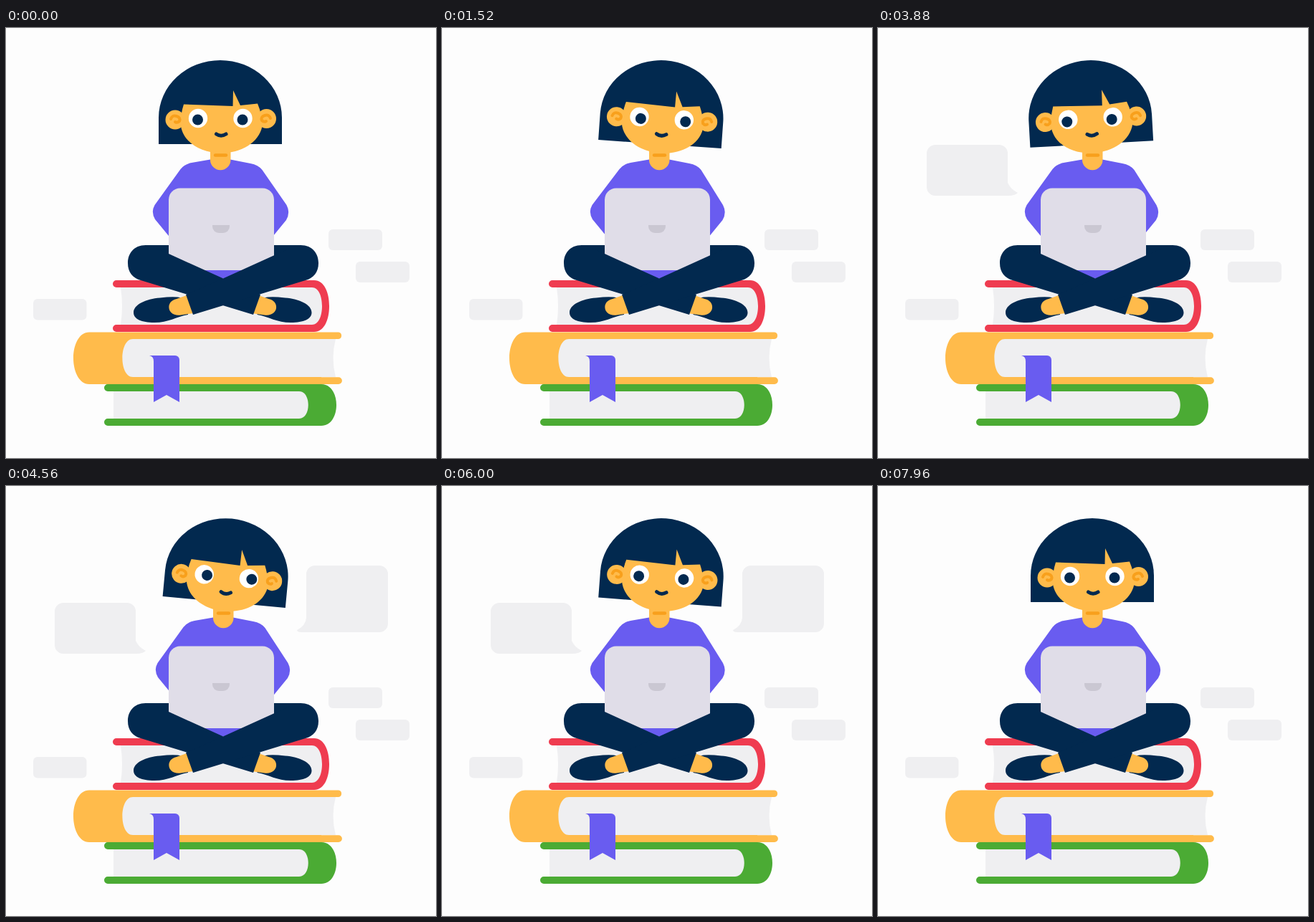
An HTML page that plays this animation: 600x600 px, repeating every 8 s.

```html
<!DOCTYPE html>
<html lang="en">
<head>
<meta charset="utf-8">
<title>Reading girl</title>
<style>
  html, body { margin: 0; width: 100%; height: 100%; overflow: hidden; background: #fdfdfd; }
  svg { display: block; width: 100vw; height: 100vh; }
  .navy { fill: #02294f; }
  .skin { fill: #ffbb4b; }
  .page { fill: #efeff1; }
  .pale { fill: #efeff1; }
  .purple { fill: #695cf0; }
  .white { fill: #fff; }
  .line { fill: none; stroke-linecap: round; }
</style>
</head>
<body>
<svg viewBox="0 0 600 600">
  <g class="pale">
    <rect x="450" y="281" width="75" height="29" rx="6"/>
    <rect x="488" y="326" width="75" height="29" rx="6"/>
    <rect x="38" y="378" width="74.500" height="29.500" rx="6"/>
    <path id="bubbleL" d="M80 163H169A12 12 0 0 1 181 175V216Q185 225 195 230Q191 234 182 234H80A12 12 0 0 1 68 222V175A12 12 0 0 1 80 163Z"/>
    <path id="bubbleR" d="M431 111H521A12 12 0 0 1 533 123V192A12 12 0 0 1 521 204H412Q406 204 406 201Q418 195 419 184V123A12 12 0 0 1 431 111Z"/>
  </g>

  <!-- Books -->
  <path fill="#ef3c50" d="M154 352H430C444 352 451 369 451 388S444 424 430 424H154a5 5 0 0 1 0-10H164V362H154a5 5 0 0 1 0-10Z"/>
  <path class="page" d="M160 362H427C436 362 441 374 441 388S436 414 427 414H160Q164 388 160 362Z"/>
  <path class="skin" d="M464 424.500H116C102 424.500 94 442 94 460.500S102 497 116 497H464a4.800 4.800 0 0 0 0-9.800H440V434H464a4.800 4.800 0 0 0 0-9.500Z"/>
  <path class="page" d="M460 434H177C157.500 434 157.500 487 177 487H460Q453 460 460 434Z"/>
  <path fill="#4bab34" d="M142 497H440C468 497 468 555 440 555H142a5 5 0 0 1 0-10H151V507H142a5 5 0 0 1 0-10Z"/>
  <path class="page" d="M150 507H409C426 507 426 545 409 545H150Z"/>
  <path class="purple" d="M200 457H236a6 6 0 0 1 6 6V522L224 512L206 522V465Q206 458 200 457Z"/>

  <!-- Body -->
  <path id="torso" class="purple"/>
  <g id="neck">
    <path class="skin" d="M285 165H313.500V184a14.250 14.250 0 0 1-28.500 0Z"/>
    <path class="line" stroke="#f8a01c" stroke-width="4.500" d="M292 177.500H307"/>
  </g>
  <g id="head">
    <path class="navy" d="M213 162V125A86 80 0 0 1 385 125V162Z"/>
    <circle class="skin" cx="236" cy="128" r="13.500"/>
    <circle class="skin" cx="363.500" cy="126.500" r="13.500"/>
    <path class="skin" d="M248 106.500L316.500 109L317 87L327 108L351 105.500Q358 122 357.500 137C353 160 328 174.500 300 174.500S248 160 244 137Q243 122 248 106.500Z"/>
    <g class="line" stroke="#f8a01c" stroke-width="4">
      <path d="M230 127Q232 121 238 123Q244 125 242 130Q239 133 236 131"/>
      <path d="M369 126Q367 120 361 122Q355 124 357 129Q360 132 363 130"/>
    </g>
    <circle class="white" cx="268" cy="126" r="13.200"/>
    <circle class="white" cx="330.500" cy="126" r="13.200"/>
    <g id="pupils" class="navy">
      <circle cx="268" cy="126" r="7.500"/>
      <circle cx="330.500" cy="126" r="7.500"/>
    </g>
    <path class="line" stroke="#02294f" stroke-width="5" d="M293.500 148Q300 152.500 307 148"/>
  </g>

  <!-- Legs and laptop -->
  <g id="thigh"><path class="navy" d="M194 303H240V345H194Z"/></g>
  <use href="#thigh" transform="matrix(-1 0 0 1 606 0)"/>
  <path fill="#e0dde8" d="M243 223.500H358a16 16 0 0 1 16 16V318L330 338H276L227 318V239.500a16 16 0 0 1 16-16Z"/>
  <path fill="#cac7d2" d="M288 275H312V277a9 9 0 0 1-9 9H297a9 9 0 0 1-9-9Z"/>
  <g id="foot">
    <path class="navy" d="M178 397C178 386 195 378 215 376.500Q245 373 253 380L254 400C237 403 227 411 207 411C189 411 178 406 178 397Z"/>
    <path class="skin" d="M252 373L262 398L244 400.500C224 403 222 381 238 378Z"/>
  </g>
  <use href="#foot" transform="matrix(-1 0 0 1 604.500 0)"/>
  <g id="shin">
    <path class="navy" d="M195 303C178 303 170 315 170 328S177 349 188 352L345 400L355 372L302 349L227 315L201 303Z"/>
  </g>
  <use href="#shin" transform="matrix(-1 0 0 1 606 0)"/>
</svg>

<script>
const LOOP = 8000;
const el = id => document.getElementById(id);
const clamp = p => Math.max(0, Math.min(1, p));

// time, head angle, sway, left elbow, right elbow, pupil x, pupil y
const POSES = [
  [0, 0, 0, 0, 0, -.5, 2],
  [850, 4.5, 4, 2, 1, 2.5, 2],
  [1600, 4, 4, 2, .5, 2, 2.3],
  [2240, -2, 0, 2, -1, -3, 2.5],
  [3880, -3.2, 0, 0, -3, -1.7, 3],
  [4560, 5.35, 4, 4, 2, 4, .8],
  [6000, 4.3, 4, 2, .5, -1, 2],
  [6800, 4, 4, 2, .5, -1, 2],
  [7600, 0, 0, 0, 0, -.5, 2],
  [8000, 0, 0, 0, 0, -.5, 2]
];

function poseAt(t) {
  const i = POSES.findIndex(p => p[0] > t);
  const a = POSES[i - 1], b = POSES[i];
  const p = (t - a[0]) / (b[0] - a[0]);
  const k = p * p * (3 - 2 * p);
  return a.map((v, j) => v + (b[j] - v) * k);
}

function backOut(p) {
  const q = p - 1;
  return 1 + 2.7 * q ** 3 + 1.7 * q * q;
}

// Pops out of the tail tip, later shrinks back into it
function bubble(id, t, start, end, x, y) {
  const grow = backOut(clamp((t - start) / 500));
  const shrink = 1 - clamp((t - end) / 350) ** 2;
  const s = Math.max(0, grow * shrink);
  el(id).setAttribute("transform", `translate(${x} ${y}) scale(${s}) translate(${-x} ${-y})`);
}

function torso(s, l, r) {
  return `M${285 + s} 183.500L${259 + s} 188Q${249 + s} 190 ${243.500 + s} 197` +
    `L${207.500 + l} 247Q${202 + l} 257 ${208 + l} 267L${236 + l} 301` +
    `L270 349H335L${364 + r} 301L${391 + r} 268Q${397 + r} 258 ${391.500 + r} 247` +
    `L${357.500 + s} 198Q${352 + s} 191 ${341 + s} 189L${313 + s} 183.500Z`;
}

function draw(now) {
  const t = now % LOOP;
  const [, angle, sway, left, right, px, py] = poseAt(t);
  el("torso").setAttribute("d", torso(sway, left, right));
  el("neck").setAttribute("transform", `translate(${sway} 0)`);
  el("head").setAttribute("transform", `translate(${sway} 0) rotate(${angle} 299 175)`);
  el("pupils").setAttribute("transform", `translate(${px} ${py})`);
  bubble("bubbleL", t, 1780, 6900, 195, 232);
  bubble("bubbleR", t, 4050, 6980, 406, 204);
}

const begin = performance.now();
function tick() {
  draw(performance.now() - begin);
  requestAnimationFrame(tick);
}
tick();
</script>
</body>
</html>
```
